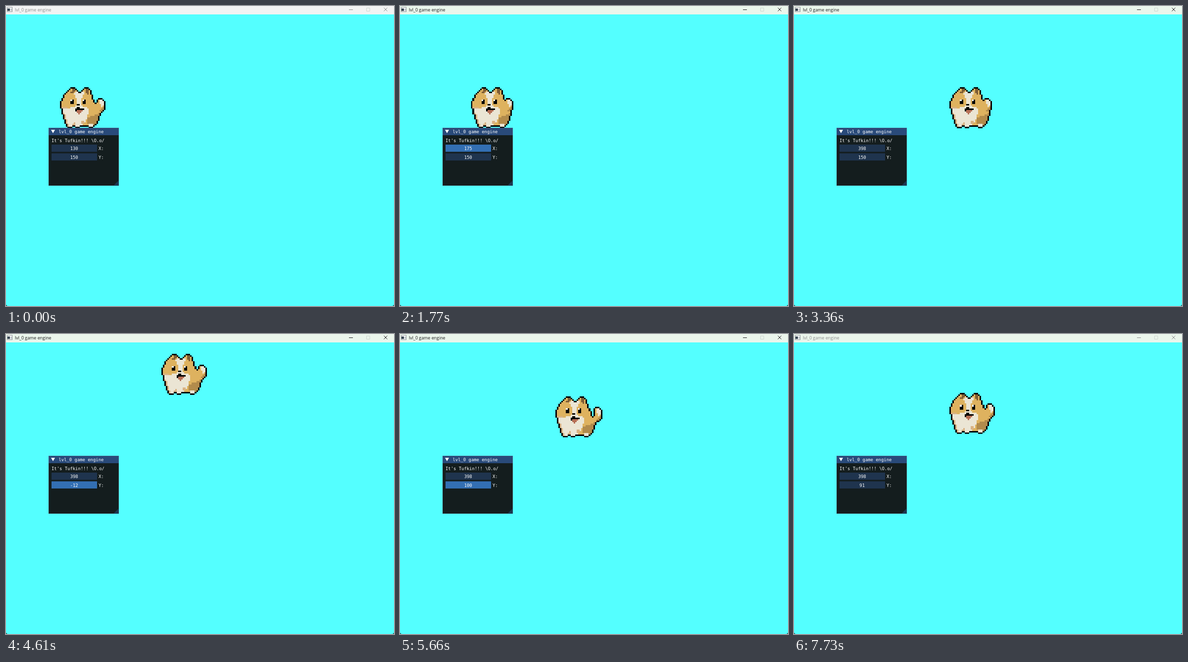
Animation, 784 px wide and 606 px high, one loop 7.8 s. Source, as an HTML page with a canvas:

```html
<!DOCTYPE html>
<html lang="en">
<head>
<meta charset="utf-8">
<title>lvl_0 game engine</title>
<style>
  html, body { margin: 0; width: 100%; height: 100%; overflow: hidden; background: #102020; }
  #stage { position: relative; width: 784px; height: 606px; overflow: hidden;
    background: #54ffff; border-radius: 0 0 4px 4px; }
  #dog { position: absolute; left: 0; top: 0; width: 95.17px; height: 82.89px;
    image-rendering: pixelated; }
  svg { position: absolute; left: 0; top: 0; }
  .caption { font: 8.9px "Open Sans", "Noto Sans", sans-serif; }
  .ui { font: 8.9px "DejaVu Sans Mono", monospace; fill: #fff; white-space: pre; }
  #bar { fill: #f3f3f3; }
  #chrome { --ink: #8c8c8c; }
  #chrome.tinted #bar { fill: #ebf6ec; }
  #chrome.focused { --ink: #1c1c1c; }
  .field { fill: #1f344e; }
  .field.active { fill: #336fb3; }
</style>
</head>
<body>
<div id="stage">
  <canvas id="dog" width="31" height="27"></canvas>
  <svg width="784" height="606" viewBox="0 0 784 606">
    <g id="chrome">
      <rect id="bar" width="784" height="17"/>
      <rect x="2.5" y="2.5" width="10" height="9" fill="#fff" stroke="#8d9296"/>
      <rect x="3" y="5" width="5" height="5" fill="#3a4a56"/>
      <rect x="9" y="5" width="3" height="5" fill="#c9d0d4"/>
      <text class="caption" x="18" y="11" fill="var(--ink)">lvl_0 game engine</text>
      <g fill="none" stroke="var(--ink)">
        <path d="M693 7.5h8"/>
        <path d="M728.5 4h6.500v6.500h-6.500z" stroke="#cdd6cf"/>
        <path d="M763.5 3.500l7 7m0-7l-7 7"/>
      </g>
    </g>

    <rect x="86" y="246" width="142" height="117" fill="#141d1e"/>
    <rect x="86" y="246" width="142" height="15" fill="#294a7a"/>
    <rect x="86.5" y="246.5" width="141" height="116" fill="none" stroke="#6e6e80" stroke-opacity=".3"/>
    <path d="M91 250h8l-4 7z" fill="#fff"/>
    <path d="M228 352v11h-11z" fill="#1d3750"/>
    <rect id="fieldX" class="field" x="92" y="280" width="92" height="14.5"/>
    <rect id="fieldY" class="field" x="92" y="297.600" width="92" height="14.5"/>
    <g class="ui">
      <text x="106.5" y="257">lvl_0 game engine</text>
      <text x="92" y="275.300">It's Tufkin!!! \O.o/</text>
      <text id="valueX" x="137.700" y="290.800" text-anchor="middle">130</text>
      <text x="187" y="290.800">X:</text>
      <text id="valueY" x="137.700" y="308.500" text-anchor="middle">150</text>
      <text x="187" y="308.500">Y:</text>
    </g>
  </svg>
</div>
<script>
const LOOP = 7800, UNIT = 0.765, WAG = 77;
const $ = id => document.getElementById(id);
const dog = $('dog'), ctx = dog.getContext('2d');

// Drags: [start, end, from, to]
const dragX = [[1564, 2140, 130, 283], [2160, 2540, 283, 138], [2570, 3220, 138, 398]];
const dragY = [[4055, 4580, 150, -12], [4640, 5118, -12, 440], [5160, 5715, 440, 91]];

function along(drags, t) {
  let value = drags[0][2];
  for (const [start, end, from, to] of drags) {
    if (t < start) break;
    const u = Math.min(1, (t - start) / (end - start));
    value = from + (to - from) * u * u * (3 - 2 * u);
  }
  return Math.trunc(value);
}

const BODY = 'M7 0h3v1h1v1h1v1h2v-1h1v-1h1v-1h3v1h1v1h1v3h1v3h1v2h1v3h3v6h-1v3h-1v2h-1v1h-1v1' +
  'h-1v1h-3v-1h-6v1h-3v-1h-2v1h-3v-1h-1v-2h-1v-3h-1v-3h-1v-4h-1v-5h1v-2h1v-2h1v-1h1v-1h1v-1h1v-1h1z';
const TAIL = 'M25 7h3v1h1v1h1v6h-1v1h-1v1h-2v1h-3v-5h1v-5h1z';

const TAN = '#deb25f', CREAM = '#ebe5d4', SHADE = '#b28b4c', BLUSH = '#d9b283';

const fur = [
  [TAN, 'M0 0h31v27h-31z'],
  ['#7f5d35', 'M8 1h2v2h-1v1h-2v-1h1zM17 1h2v4h-1v-1h-1z'],
  [CREAM, 'M10 3h6v2h-1v2h-1v5h-3v-5h-1v-2h-1v-1h1z'],
  [CREAM, 'M0 14h7v-1h3v-1h5v1h3v1h1v4h-1v3h-1v2h-2v3h-11v-3h-1v-3h-1v-5h-2z'],
  [BLUSH, 'M1 13h4v1h-4zM2 17h1v1h1v3h1v3h1v2h-2v-4h-1v-3h-1z'],
  [BLUSH, 'M9 23h1v3h-2v-2h1zM14 22h2v2h-2z'],
  [SHADE, 'M18 20h2v-1h3v-1h2v-1h2v3h-1v3h-1v2h-3v-1h-4z'],
  [CREAM, 'M19 24h3v2h-3z'],
  ['#000', 'M8 8h1v3h-2v-2h1zM16 8h1v3h-2v-2h1z'],
  ['#fff', 'M7 8h1v1h-1zM15 8h1v1h-1z'],
  ['#000', 'M11 11h2v1h-2zM11 13h2v1h3v1h-5v1h-1v-2h1z'],
  ['#b66e55', 'M11 15h4v1h-1v1h-1v1h-1v-1h-1z']
].map(([color, d]) => [color, new Path2D(d)]);

const tailTip = new Path2D('M26 8h2v1h1v3h-1v1h-1v-2h-1z');
const tailShade = new Path2D('M29 13v2h-1v1h-2v-1h1v-1h1v-1z');

function paint(path, color) {
  ctx.fillStyle = color;
  ctx.fill(path);
}

function drawDog(shift) {
  ctx.clearRect(0, 0, 31, 27);
  const shape = new Path2D(BODY);
  shape.addPath(new Path2D(TAIL), { e: shift });
  paint(shape, '#000');
  ctx.save();
  // Intersecting four shifted copies leaves a one-cell outline
  for (const [dx, dy] of [[1, 0], [-1, 0], [0, 1], [0, -1]]) {
    ctx.translate(dx, dy);
    ctx.clip(shape);
    ctx.translate(-dx, -dy);
  }
  for (const [color, path] of fur) paint(path, color);
  ctx.translate(shift, 0);
  paint(tailTip, CREAM);
  paint(tailShade, SHADE);
  ctx.restore();
}

const tailShifts = [0, 1, 0, -2];
let lastShift = null;

function render() {
  const t = performance.now() % LOOP;
  const x = along(dragX, t), y = along(dragY, t);
  const shift = tailShifts[Math.floor(t / WAG + 0.3) % 4];
  if (shift !== lastShift) drawDog(lastShift = shift);
  dog.style.transform =
    `translate(${109 + (x - 130) * UNIT}px, ${164 + (y - 150) * UNIT}px)`;
  $('valueX').textContent = x;
  $('valueY').textContent = y;
  $('fieldX').classList.toggle('active', t >= 1400 && t < 3350);
  $('fieldY').classList.toggle('active', t >= 3990 && t < 6150);
  $('chrome').classList.toggle('tinted', t >= 1250);
  $('chrome').classList.toggle('focused', t >= 1250 && t < 7580);
  requestAnimationFrame(render);
}
render();
</script>
</body>
</html>
```
